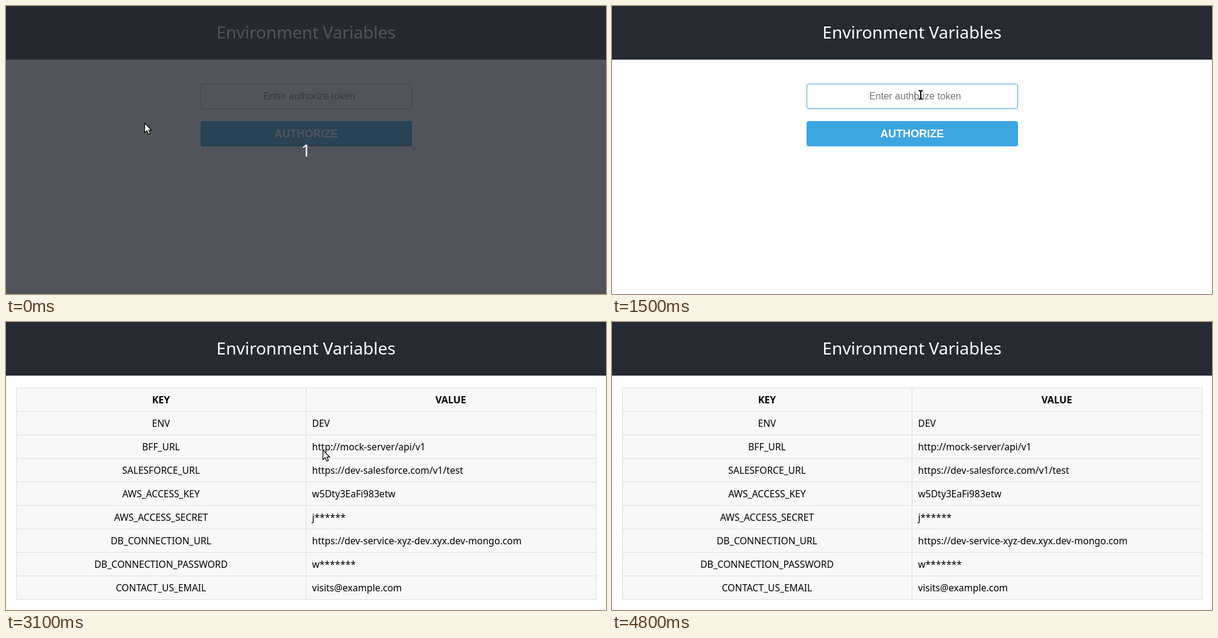
An HTML page for the animation above (5300 ms loop, 993 by 478 pixels).

```html
<!DOCTYPE html>
<html lang="en">
<head>
<meta charset="utf-8">
<title>Environment Variables</title>
<style>
  html, body { margin: 0; width: 100%; height: 100%; overflow: hidden; background: #fff; }
  svg { display: block; }
  text { font-family: "Noto Sans", "Open Sans", sans-serif; }
  .mid { text-anchor: middle; }
  .title { font-size: 28px; fill: #fff; }
  #form text { font-family: "Liberation Sans", Arial, sans-serif; font-size: 16px; fill: #757575; }
  #form .label { font-size: 18px; font-weight: bold; fill: #fff; }
  #table text { font-size: 15.6px; fill: #000; }
  #table .head { font-size: 16px; font-weight: bold; }
</style>
</head>
<body>
<svg width="993" height="478" viewBox="0 0 993 478">
  <defs>
    <path id="bar" d="M-3.5 -6.5H-1.5L0 -5.5L1.5 -6.5H3.5M0 -5.5V6.5M-3.5 7.5H-1.5L0 6.5L1.5 7.5H3.5"/>
  </defs>
  <rect width="993" height="89" fill="#262a33"/>
  <text class="title mid" x="496.5" y="54">Environment Variables</text>

  <g id="form">
    <rect id="field" x="322.5" y="129.5" width="349" height="41" rx="3.5" fill="#fff"/>
    <text id="hint" class="mid" x="501.7" y="155">Enter authorize token</text>
    <text id="dots" class="mid" x="501.7" y="155" style="fill:#808088"></text>
    <rect id="caret" y="141" width="1" height="17" fill="#555"/>
    <rect id="button" x="322" y="191" width="350" height="42" rx="4"/>
    <text class="label mid" x="496.7" y="218">AUTHORIZE</text>
  </g>

  <g id="table"></g>

  <g id="overlay">
    <rect width="993" height="478" fill="#262a33" opacity=".8"/>
    <text class="title mid" x="496.5" y="250">1</text>
  </g>

  <g id="cursor">
    <path id="arrow" d="M.5 .5V16.5L4.3 13.1L6.8 18.9L9.6 17.7L7.2 12.1H11.8Z" fill="#fff" stroke="#000" stroke-width="1.2"/>
    <g id="beam" fill="none">
      <use href="#bar" stroke="#fff" stroke-width="4"/>
      <use href="#bar" stroke="#000" stroke-width="2"/>
    </g>
  </g>
</svg>
<script>
const LOOP = 5300, STEP = 100;
const ROW = 39, TOP = 109, LEFT = 17, WIDTH = 960;
const $ = id => document.getElementById(id);
const show = (id, on) => $(id).style.display = on ? '' : 'none';

const rows = [
  ['KEY', 'VALUE'],
  ['ENV', 'DEV'],
  ['BFF_URL', 'http://mock-server/api/v1'],
  ['SALESFORCE_URL', 'https://dev-salesforce.com/v1/test'],
  ['AWS_ACCESS_KEY', 'w5Dty3EaFi983etw'],
  ['AWS_ACCESS_SECRET', 'j******'],
  ['DB_CONNECTION_URL', 'https://dev-service-xyz-dev.xyx.dev-mongo.com'],
  ['DB_CONNECTION_PASSWORD', 'w*******'],
  ['CONTACT_US_EMAIL', 'visits@example.com']
];

function buildTable() {
  const half = WIDTH / 2;
  const text = (s, x, y, cls) => `<text class="${cls}" x="${x}" y="${y}">${s}</text>`;
  const box = (x, y, w) =>
    `<rect x="${x + .5}" y="${y + .5}" width="${w}" height="${ROW}" fill="#f8f8f8" stroke="#ddd"/>`;
  return rows.map(([key, value], i) => {
    const y = TOP + ROW * i, base = y + 26, head = i ? '' : ' head';
    return box(LEFT, y, half - 1) + box(LEFT + half - 1, y, half) +
      text(key, LEFT + half / 2 - .5, base, 'mid' + head) +
      (i ? text(value, LEFT + half + 9.5, base, '')
         : text(value, LEFT + half * 1.5 - 1, base, 'mid head'));
  }).join('');
}

$('table').innerHTML = buildTable();
$('dots').textContent = '•'.repeat(21);

// Pointer moves; bend makes the vertical part settle sooner
const home = { x: 229, y: 194 };
const moves = [
  { from: 400, to: 900, x: 511, y: 147 },
  { from: 2100, to: 2200, x: 508, y: 144 },
  { from: 2200, to: 2600, x: 524, y: 212 },
  { from: 3400, to: 4200, x: 94, y: 30, bend: 4 },
  { from: 4500, to: 4600, x: 93, y: 26 }
];
const easeOut = (p, power = 1.65) => 1 - (1 - p) ** power;

function pointer(t) {
  return moves.reduce((at, m) => {
    const p = Math.min(1, Math.max(0, (t - m.from) / (m.to - m.from)));
    return {
      x: Math.round(at.x + (m.x - at.x) * easeOut(p)),
      y: Math.round(at.y + (m.y - at.y) * easeOut(p, m.bend))
    };
  }, home);
}

function draw(t) {
  const within = (a, b) => t >= a && t < b;
  const { x, y } = pointer(t);
  const filled = t >= 1800;
  const beam = t < 2200 && x > 322 && y < 171;
  const hover = x > 322 && y > 191;

  show('overlay', t < 200);
  show('form', t < 3100);
  show('table', t >= 3100);
  show('hint', !filled);
  show('dots', filled);
  show('caret', within(1500, 2300));
  $('caret').setAttribute('x', filled ? 561 : 501);
  $('field').setAttribute('stroke', within(1500, 2800) ? '#3ca6e0' : '#bbb');
  $('button').setAttribute('fill',
    within(2800, 2900) ? '#2b92ca' : hover ? '#2f9ad3' : '#3ca6e0');

  show('cursor', t < 4800);
  show('arrow', !beam);
  show('beam', beam);
  $('cursor').setAttribute('transform', `translate(${x} ${y})`);
}

const start = performance.now();
function tick() {
  const t = (performance.now() - start) % LOOP;
  draw(Math.floor(t / STEP) * STEP);
  requestAnimationFrame(tick);
}
tick();
</script>
</body>
</html>
```
